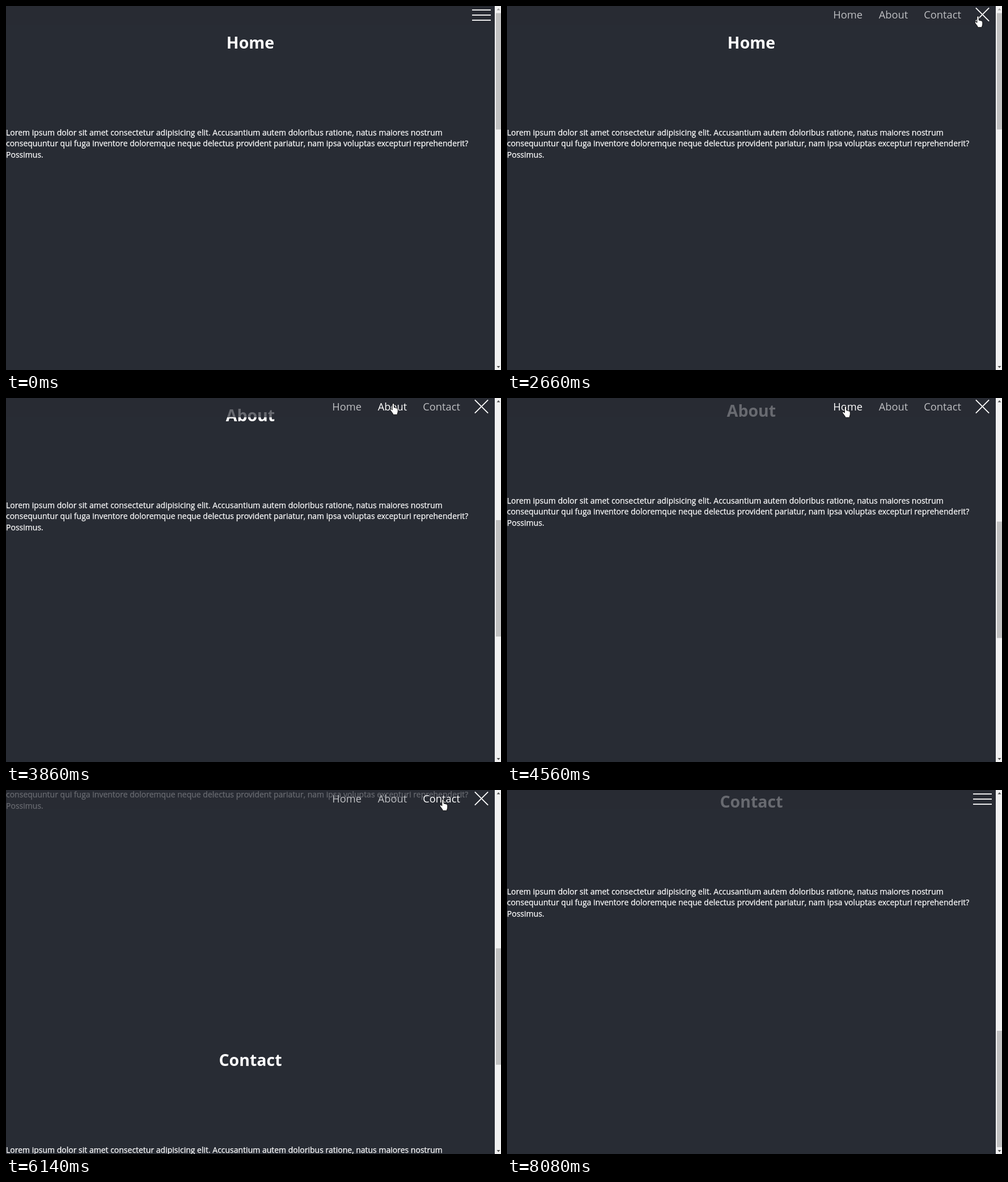
An HTML page for the animation above (9.57 s loop, 873 by 641 pixels).

```html
<!DOCTYPE html>
<html lang="en">
<head>
<meta charset="utf-8">
<title>Sticky navigation</title>
<style>
  html, body { margin: 0; width: 100%; height: 100%; overflow: hidden; background: #282c34; }
  svg { display: block; width: 873px; height: 641px; font-family: "Open Sans", "Noto Sans", sans-serif; fill: #fff; }
  .title { font-size: 28.5px; font-weight: 700; text-anchor: middle; }
  .copy { font-size: 14px; stroke: #fff; stroke-width: .25; }
  #links { font-size: 18.3px; }
  #links text { fill: #bebfc2; }
  #links text.hover { fill: #fff; }
  .cursor { stroke: #000; stroke-width: .8; stroke-linejoin: round; }
</style>
</head>
<body>
<svg viewBox="0 0 873 641">
  <rect width="873" height="641" fill="#282c34"/>
  <g id="page"></g>
  <rect width="862" height="34" fill="#282c34" opacity=".7"/>
  <g id="links"></g>
  <g id="burger">
    <rect x="-16.5" y="-.9" width="33" height="1.8"/>
    <rect x="-16.5" y="-.9" width="33" height="1.8"/>
    <rect x="-16.5" y="-.9" width="33" height="1.8"/>
  </g>
  <rect x="862" width="11" height="641" fill="#f1f1f1"/>
  <rect id="thumb" x="864" width="9" height="205" fill="#c1c1c1"/>
  <path id="up" d="M865.5 7.5L868.5 4L871.5 7.5Z"/>
  <path d="M865.5 634L868.5 637.5L871.5 634Z" fill="#505050"/>
  <g id="pointer" class="cursor">
    <path id="hand" transform="scale(1.1)" d="M-1.5 10.5V1.5a1.5 1.5 0 0 1 3 0V6.5l4 1q2 .5 2 2.5V12.5q0 2-1 4V18H-.5V16.5L-4.5 11q-.8-1.4 .3-2q1-.5 2.7 1.5Z"/>
    <path id="arrow" d="M0 0V14.5L3.4 11.4L5.6 16.5L7.8 15.5L5.6 10.6H10.2Z"/>
  </g>
</svg>
<script>
const LOOP = 9570;
const $ = id => document.getElementById(id);

const COPY = [
  "Lorem ipsum dolor sit amet consectetur adipisicing elit. Accusantium autem doloribus ratione, natus maiores nostrum",
  "consequuntur qui fuga inventore doloremque neque delectus provident pariatur, nam ipsa voluptas excepturi reprehenderit?",
  "Possimus."
];
const SECTIONS = [["Home", 75], ["About", 676], ["Contact", 1321]];
const LINKS = [["Home", 575.3, 52], ["About", 655.8, 52], ["Contact", 735.3, 66]];

// time, page offset
const SCROLL = [[3456, 0], [3896, 643], [4600, 643], [5040, 0],
  [5330, 0], [5770, 643], [5975, 643], [6415, 1290]];
// time, tip x, tip y
const POINTER = [[740, 860, 1], [1270, 833.5, 18], [2620, 833.5, 18], [3030, 683, 9.5],
  [3900, 683, 9.5], [4310, 597, 14.5], [5040, 597, 14.5], [5240, 682, 17.5],
  [5775, 682, 17.5], [5960, 770.5, 16.5], [6710, 770.5, 16.5], [7000, 788, 29],
  [7280, 815, 30], [7570, 834, 27], [7790, 834, 27], [8070, 852, 3]];
// time, openness
const MENU = [[1510, 0], [1830, 1], [7730, 1], [8060, 0]];

function bezier(x1, y1, x2, y2) {
  const at = (a, b, u) => 3 * a * u * (1 - u) ** 2 + 3 * b * u * u * (1 - u) + u ** 3;
  return x => {
    let low = 0, high = 1;
    for (let i = 0; i < 20; i++) {
      const mid = (low + high) / 2;
      if (at(x1, x2, mid) < x) low = mid; else high = mid;
    }
    return at(y1, y2, (low + high) / 2);
  };
}
const ease = bezier(.25, .1, .25, 1);
const easeInOut = bezier(.42, 0, .58, 1);
const mix = (a, b, p) => a + (b - a) * p;

function sample(track, t, easing) {
  const next = track.findIndex(key => key[0] > t);
  if (next === 0) return track[0].slice(1);
  if (next < 0) return track[track.length - 1].slice(1);
  const a = track[next - 1], b = track[next];
  const p = easing((t - a[0]) / (b[0] - a[0]));
  return a.slice(1).map((v, i) => mix(v, b[i + 1], p));
}

function addText(parent, text, x, y, className) {
  const node = document.createElementNS("http://www.w3.org/2000/svg", "text");
  node.textContent = text;
  node.setAttribute("x", x);
  node.setAttribute("y", y);
  if (className) node.setAttribute("class", className);
  parent.appendChild(node);
  return node;
}

for (const [name, y] of SECTIONS) {
  addText($("page"), name, 431, y, "title");
  COPY.forEach((line, i) => addText($("page"), line, 0, y + 153 + Math.round(i * 19.4), "copy"));
}
const links = LINKS.map(([name, x]) => addText($("links"), name, x, 22));
const bars = $("burger").children;

function drawMenu(open) {
  $("links").setAttribute("opacity", open);
  [7, 16, 25].forEach((y, i) => {
    const angle = (1 - i) * 45 * open;
    bars[i].setAttribute("transform", `translate(838.5 ${mix(y, 15, open)}) rotate(${angle})`);
  });
  bars[1].setAttribute("opacity", 1 - open);
}

function drawScroll(offset) {
  $("page").setAttribute("transform", `translate(0 ${-Math.round(offset)})`);
  $("thumb").setAttribute("y", 12.5 + offset * .319);
  $("up").setAttribute("fill", offset > 0 ? "#505050" : "#a3a3a3");
}

function drawPointer(x, y, visible, open) {
  const over = (left, width) => visible && y < 32 && x >= left && x <= left + width;
  let active = over(820, 37);
  LINKS.forEach(([, left, width], i) => {
    const hover = open > 0 && over(left, width);
    links[i].classList.toggle("hover", hover);
    active = active || hover;
  });
  $("pointer").setAttribute("visibility", visible ? "visible" : "hidden");
  $("pointer").setAttribute("transform", `translate(${x} ${y})`);
  $("hand").setAttribute("display", active ? "inline" : "none");
  $("arrow").setAttribute("display", active ? "none" : "inline");
}

function render(t) {
  const [open] = sample(MENU, t, ease);
  const [offset] = sample(SCROLL, t, easeInOut);
  const [x, y] = sample(POINTER, t, easeInOut);
  drawMenu(open);
  drawScroll(offset);
  drawPointer(x, y, t >= 760 && t < 8070, open);
}

const start = performance.now();
function tick() {
  render((performance.now() - start) % LOOP);
  requestAnimationFrame(tick);
}
tick();
</script>
</body>
</html>
```
